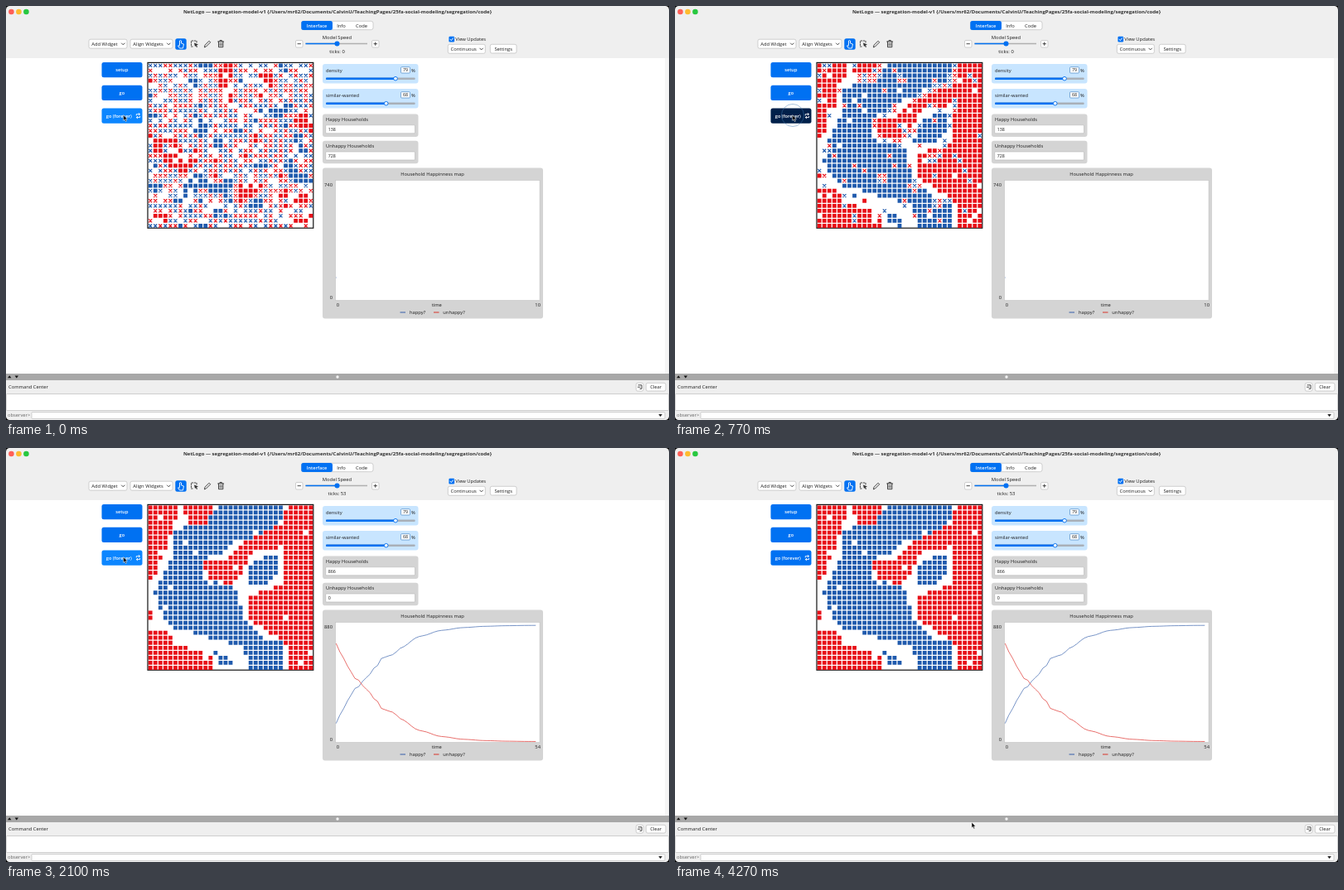
Animation, 800 px wide and 500 px high, one loop 4480 ms. Source, as an HTML page:

```html
<!DOCTYPE html>
<html lang="en">
<head>
<meta charset="utf-8">
<title>Segregation model</title>
<style>
  html, body { margin: 0; width: 100%; height: 100%; overflow: hidden; background: #000; }
  svg { display: block; width: 800px; height: 500px; }
  text { font: 5.8px "Open Sans", "Noto Sans", sans-serif; fill: #1c1c1c; }
  .mid { text-anchor: middle; }
  .end { text-anchor: end; }
  .title { font-weight: 700; font-size: 6.06px; fill: #333; }
  .light { fill: #fff; font-weight: 600; font-size: 5.6px; }
  .small { font-size: 5.3px; }
  .box { fill: #fff; stroke: #b4b4b4; stroke-width: .6; }
  .blue { fill: #0071f2; }
  .gray { fill: #d4d4d4; }
  .icon { fill: none; stroke: #333; stroke-width: .9; stroke-linecap: round; stroke-linejoin: round; }
  .white { stroke: #fff; }
  .curve { fill: none; stroke-width: .75; stroke-linejoin: round; }
</style>
</head>
<body>
<svg viewBox="0 0 800 500" xmlns="http://www.w3.org/2000/svg">
  <rect width="800" height="500" rx="4.5" fill="#efefef"/>
  <rect y="63" width="795.5" height="381" fill="#fff"/>
  <rect x="795.5" y="63" width="4.5" height="381" fill="#f5f5f5"/>

  <!-- title bar -->
  <circle cx="6.4" cy="7" r="3.3" fill="#ff5f57"/>
  <circle cx="15.4" cy="7" r="3.3" fill="#febc2e"/>
  <circle cx="24.4" cy="7" r="3.3" fill="#28c840"/>
  <text class="mid title" x="400" y="9.3">NetLogo — segregation-model-v1 {/Users/mr62/Documents/CalvinU/TeachingPages/25fa-social-modeling/segregation/code}</text>

  <!-- tabs -->
  <rect class="box" x="356.5" y="18.3" width="86.5" height="10.4" rx="2.5"/>
  <rect class="blue" x="356.3" y="18" width="37.7" height="11" rx="2.5"/>
  <text class="mid light" x="375" y="25.6">Interface</text>
  <text class="mid" x="404.5" y="25.6">Info</text>
  <text class="mid" x="429" y="25.6">Code</text>

  <!-- toolbar -->
  <g id="combos"></g>
  <rect class="blue" x="204.3" y="39.3" width="13.4" height="13.4" rx="2.5"/>
  <path class="icon white" d="M209.5 47v-5q1-1 2 0v3l3 1-1 5h-4l-2-3q0-1 2 0"/>
  <path class="icon" stroke-dasharray="1.6 1.5" d="M230 44v-2h-6.5v7h3"/>
  <path d="M227 44.5l5 2-2 1 1 2-1 .6-1-2-1 1z" fill="#333"/>
  <path class="icon" d="M239.5 49.5l.6-2.3 5-5 1.6 1.6-5 5z"/>
  <path class="icon" d="M255.700 43h7M258 42.500v-1h2.400v1M256.500 43v6.700h5.400v-6.700M258.200 45v3M260.200 45v3"/>

  <text class="mid" x="399.5" y="39.7">Model Speed</text>
  <rect class="box" x="349.5" y="41.5" width="8.5" height="8.5" rx="1.5"/>
  <rect class="box" x="441.5" y="41.5" width="8.5" height="8.5" rx="1.5"/>
  <path class="icon" d="M352 45.7h3.500M444 45.7h3.500M445.7 44v3.400"/>
  <path d="M361.5 45.5H436" stroke="#b0b0b0" stroke-width="1.3"/>
  <path d="M361.5 45.5H399" stroke="#0071f2" stroke-width="1.3"/>
  <circle class="blue" cx="399.5" cy="45.5" r="3"/>
  <text id="ticks" class="mid" x="399.5" y="56.6"></text>
  <rect class="blue" x="534.4" y="36.8" width="6.7" height="6.7" rx="1.3"/>
  <path class="icon white" d="M536 40.2l1.3 1.500 2.2-3"/>
  <text x="542.3" y="42.3">View Updates</text>
  <rect class="box" x="584.3" y="46.3" width="31.7" height="10.7" rx="2"/>
  <text class="mid" x="600.2" y="53.7">Settings</text>

  <!-- model buttons -->
  <rect class="blue" x="115.5" y="68" width="49" height="18.3" rx="2.5"/>
  <rect class="blue" x="115.5" y="95.8" width="49" height="18.2" rx="2.5"/>
  <rect id="forever" x="115.5" y="123.5" width="49" height="18.3" rx="2.5"/>
  <text class="mid light" x="139.8" y="79">setup</text>
  <text class="mid light" x="139.8" y="106.8">go</text>
  <text class="mid light" x="136.3" y="134.6">go (forever)</text>
  <path class="icon white" d="M157.3 132v-1.300h4M160.2 129.500l1.300 1.200-1.300 1.200M161.600 133.300v1.300h-4M158.700 133.400l-1.300 1.200 1.300 1.200"/>

  <rect x="171" y="68.4" width="199.8" height="199.8" fill="#fff" stroke="#111" stroke-width="1.2"/>
  <g id="world"></g>
  <g id="widgets"></g>

  <!-- plot -->
  <rect class="gray" x="382" y="195.5" width="266" height="182" rx="3"/>
  <rect x="397.7" y="210.6" width="246.3" height="144.8" fill="#fff" stroke="#c0c0c0" stroke-width=".5"/>
  <text class="mid" x="514.5" y="204.7">Household Happinness map</text>
  <text id="top" class="end" x="394" y="218"></text>
  <text class="end" x="394" y="354">0</text>
  <text class="mid" x="400.3" y="363.3">0</text>
  <text class="mid" x="519.8" y="363.3">time</text>
  <text id="right" class="end" x="645" y="363.3"></text>
  <path d="M475.5 370h6.500" stroke="#345da9"/>
  <path d="M516 370h6.500" stroke="#d73229"/>
  <text x="487" y="372">happy?</text>
  <text x="527.3" y="372">unhappy?</text>
  <path id="happyLine" class="curve" stroke="#4c72b4"/>
  <path id="sadLine" class="curve" stroke="#e0403c"/>

  <!-- command center -->
  <rect y="444" width="800" height="8" fill="#a8a8a8"/>
  <path d="M2 449.3h4.400l-2.200-3zM10.6 446.6h4.400l-2.200 3z" fill="#111"/>
  <circle cx="400" cy="448" r="1.7" fill="#f4f4f4"/>
  <text x="3" y="462.3">Command Center</text>
  <rect class="box" x="760.3" y="455.3" width="8.7" height="9.7" rx="1.8"/>
  <path class="icon" d="M763 457.8h4v4.500h-2M762.5 460.2h2.500"/>
  <rect class="box" x="772.3" y="455.3" width="23.7" height="9.7" rx="2"/>
  <text class="mid" x="784.2" y="462.3">Clear</text>
  <rect class="box" x=".3" y="468.5" width="799.4" height="20" rx="1"/>
  <text x="2" y="496.2" style="fill:#666">observer&gt;</text>
  <rect class="box" x="31" y="490.5" width="764" height="8" rx="1"/>
  <path d="M787.3 493h4.600l-2.300 3z" fill="#222"/>

  <circle id="ring" cx="142" cy="132" fill="none" stroke="#477cb5"/>
  <path id="cursor" d="M0 0v6.700l1.500-1.300 1.100 2.500 1.200-.5-1.100-2.400h2z" stroke="#fff" stroke-width=".55"/>
</svg>

<script>
const LOOP = 4480, STEP = 70, SIZE = 33, PITCH = 6.05;
const RED = '#e80f18', BLUE = '#1f5aad';
const el = id => document.getElementById(id);

const combo = (x, y, w, label) => `
  <rect class="box" x="${x}" y="${y}" width="${w}" height="11" rx="2"/>
  <text x="${x + 3.3}" y="${y + 7.6}">${label}</text>
  <path class="icon" d="M${x + w - 6.5} ${y + 4.8}l1.8 1.8 1.8-1.8"/>`;
const slider = (y, label, value, thumb) => `
  <rect x="382" y="${y}" width="115.5" height="23.5" rx="3" fill="#c8e5ff"/>
  <text x="386" y="${y + 9.7}">${label}</text>
  <rect x="476.5" y="${y + 3.7}" width="11" height="7.3" rx="1" fill="#fff" stroke="#4a88c4" stroke-width=".7"/>
  <text class="small mid" x="482" y="${y + 9.3}">${value}</text>
  <text x="489" y="${y + 9.7}">%</text>
  <rect x="386" y="${y + 16.5}" width="107.7" height="2.5" rx="1" fill="#a9b0b8"/>
  <rect class="blue" x="386" y="${y + 16.5}" width="${thumb - 386}" height="2.5" rx="1"/>
  <circle cx="${thumb}" cy="${y + 17.7}" r="2.3" fill="#fff" stroke="#0071f2" stroke-width=".9"/>`;
const monitor = (y, label, id) => `
  <rect class="gray" x="382" y="${y}" width="115.5" height="27.5" rx="3"/>
  <text x="386" y="${y + 8.5}">${label}</text>
  <rect class="box" x="385.7" y="${y + 13.3}" width="107.8" height="10" rx="1"/>
  <text id="${id}" class="small" x="388.8" y="${y + 20.3}"></text>`;

el('combos').innerHTML = combo(100, 40.2, 46, 'Add Widget') + combo(150, 40.2, 51, 'Align Widgets') +
  combo(533.3, 46.3, 45, 'Continuous');
el('widgets').innerHTML = slider(70, 'density', 79, 470) + slider(100, 'similar-wanted', 68, 458.7) +
  monitor(130.5, 'Happy Households', 'happy') + monitor(162.7, 'Unhappy Households', 'unhappy');

// seeded random numbers
let seed = 4127;
const rand = () => {
  seed = seed + 0x6D2B79F5 | 0;
  let n = Math.imul(seed ^ seed >>> 15, 1 | seed);
  n = n + Math.imul(n ^ n >>> 7, 61 | n) ^ n;
  return ((n ^ n >>> 14) >>> 0) / 4294967296;
};
const grid = make => Array.from({ length: SIZE * SIZE }, (_, i) => make(i % SIZE, Math.floor(i / SIZE)));
const cellX = c => 174.2 + PITCH * c;
const cellY = r => 71.9 + PITCH * r;

// shuffled start with a few denser spots: column, row, colour
const spots = [[14, 1, 1], [9, 12, -1], [28, 20, -1], [15, 26, -1], [19, 26, 1], [29, 26, 1], [31, 12, 1], [1, 15, 1]];
const start = grid((c, r) => {
  const pull = spots.reduce((sum, [x, y, k]) => sum + k * Math.exp(-((c - x) ** 2 + (r - y) ** 2) / 3.5), 0);
  if (rand() > .79 + .15 * Math.abs(pull)) return 0;
  return rand() < .5 + .48 * pull ? 1 : -1;
});

// settled neighbourhoods, outlined on the stage
const reds = [
  [171,69, 203,69, 209,76, 192,124, 178,158, 171,158],
  [213,69, 250,69, 243,94, 221,94],
  [171,193, 182,202, 171,211],
  [171,220, 196,220, 201,236, 250,250, 250,269, 171,269],
  [238,137, 262,137, 290,113, 333,92, 340,69, 371,69, 371,269, 341,269, 341,240, 292,205,
    292,178, 334,166, 336,134, 322,122, 300,125, 274,165, 244,160]
];
const blues = [
  [262,69, 334,69, 334,82, 316,103, 274,115, 262,128, 236,135, 236,156, 276,170, 287,205,
    315,232, 334,235, 334,269, 291,269, 288,240, 196,216, 178,175, 203,130, 203,97, 232,94],
  [292,141, 318,129, 330,129, 330,146, 312,168, 292,168],
  [250,245, 282,258, 256,262]
];
const inside = (p, x, y) => {
  let hit = false;
  for (let i = 0, j = p.length - 2; i < p.length; j = i, i += 2)
    if (p[i + 1] > y !== p[j + 1] > y && x < (p[j] - p[i]) * (y - p[i + 1]) / (p[j + 1] - p[i + 1]) + p[i]) hit = !hit;
  return hit;
};
const settled = grid((c, r) => {
  const within = p => inside(p, cellX(c), cellY(r));
  if (rand() < .02) return 0;
  return reds.some(within) ? 1 : blues.some(within) ? -1 : 0;
});
const order = grid(rand);

// a household is happy when 68% of its neighbours share its colour
const isHappy = (cells, c, r) => {
  let same = 0, total = 0;
  for (let dy = -1; dy < 2; dy++) for (let dx = -1; dx < 2; dx++) {
    if (!dx && !dy) continue;
    const other = cells[(r + dy + SIZE) % SIZE * SIZE + (c + dx + SIZE) % SIZE];
    if (other) total++;
    if (other === cells[r * SIZE + c]) same++;
  }
  return same >= .68 * total;
};

let shown = -1;
function drawWorld(progress) {
  if (progress === shown) return;
  shown = progress;
  const cells = start.map((v, i) => order[i] < progress ? settled[i] : v);
  const squares = { '1': '', '-1': '' }, crosses = { '1': '', '-1': '' };
  cells.forEach((v, i) => {
    if (!v) return;
    const c = i % SIZE, r = Math.floor(i / SIZE), x = cellX(c), y = cellY(r);
    if (progress === 1 || isHappy(cells, c, r)) squares[v] += `M${x - 2.4} ${y - 2.4}h4.8v4.8h-4.8z`;
    else crosses[v] += `M${x - 2} ${y - 2}l4 4m0-4l-4 4`;
  });
  el('world').innerHTML = [[1, RED], [-1, BLUE]].map(([v, color]) =>
    `<path d="${squares[v]}" fill="${color}"/><path d="${crosses[v]}" stroke="${color}" stroke-width="1.2"/>`).join('');
}

// happy households per tick, levelling off after the first ones
const early = [138, 200, 247, 303, 349, 396, 409, 447, 475, 501, 545, 565, 617, 627, 637, 645, 666];
const happyAt = n => n < early.length ? early[n]
  : 863 - (197 + 12 * Math.sin(n * 1.1)) * Math.exp((16 - n) / 7.5);

function drawPlot(tick, right, top) {
  const line = value => 'M' + Array.from({ length: tick + 1 }, (_, n) =>
    `${398.3 + n * 245.5 / right} ${355.2 - value(happyAt(n)) * 144 / top}`).join('L');
  el('happyLine').setAttribute('d', tick ? line(v => v) : 'M398 328h.7');
  el('sadLine').setAttribute('d', tick ? line(v => 866 - v) : '');
  el('top').textContent = top;
  el('right').textContent = right;
  el('ticks').textContent = 'ticks: ' + tick;
}

function draw(t) {
  drawWorld(t < 700 ? 0 : t < 770 ? .76 : t < 840 ? .88 : t < 910 ? .95 : 1);

  const [tick, right, top, happy] = t < 980 ? [0, 10, 740, 138] : t < 1120 ? [16, 16, 740, 666] : [53, 54, 880, 866];
  drawPlot(tick, right, top);
  el('happy').textContent = happy;
  el('unhappy').textContent = 866 - happy;

  let x = 141.7, y = 131.6;
  if (t >= 3080) {
    const u = Math.min(1, (t - 3080) / 1190), ease = u * u * (3 - 2 * u);
    x = 147 + 211 * ease;
    y = 136.5 + 315.5 * ease;
  }
  el('cursor').setAttribute('transform', `translate(${x} ${y})`);

  const hover = x < 164.5 && y < 141.8;
  const pressed = t >= 490 && t < 1050;
  el('forever').setAttribute('fill', pressed ? '#00204a' : hover ? '#0c86ff' : '#0071f2');

  const age = (t - 490) / STEP;
  const ringOn = age >= 0 && age < 6;
  el('ring').setAttribute('r', ringOn ? 1.7 + 3.3 * Math.min(age, 3.6) : 0);
  el('ring').setAttribute('opacity', ringOn ? Math.min(.7, (6 - age) * .23) : 0);
}

const begin = performance.now();
let last = -1;
function loop() {
  const t = Math.floor((performance.now() - begin) % LOOP / STEP) * STEP;
  if (t !== last) draw(last = t);
  requestAnimationFrame(loop);
}
loop();
</script>
</body>
</html>
```
